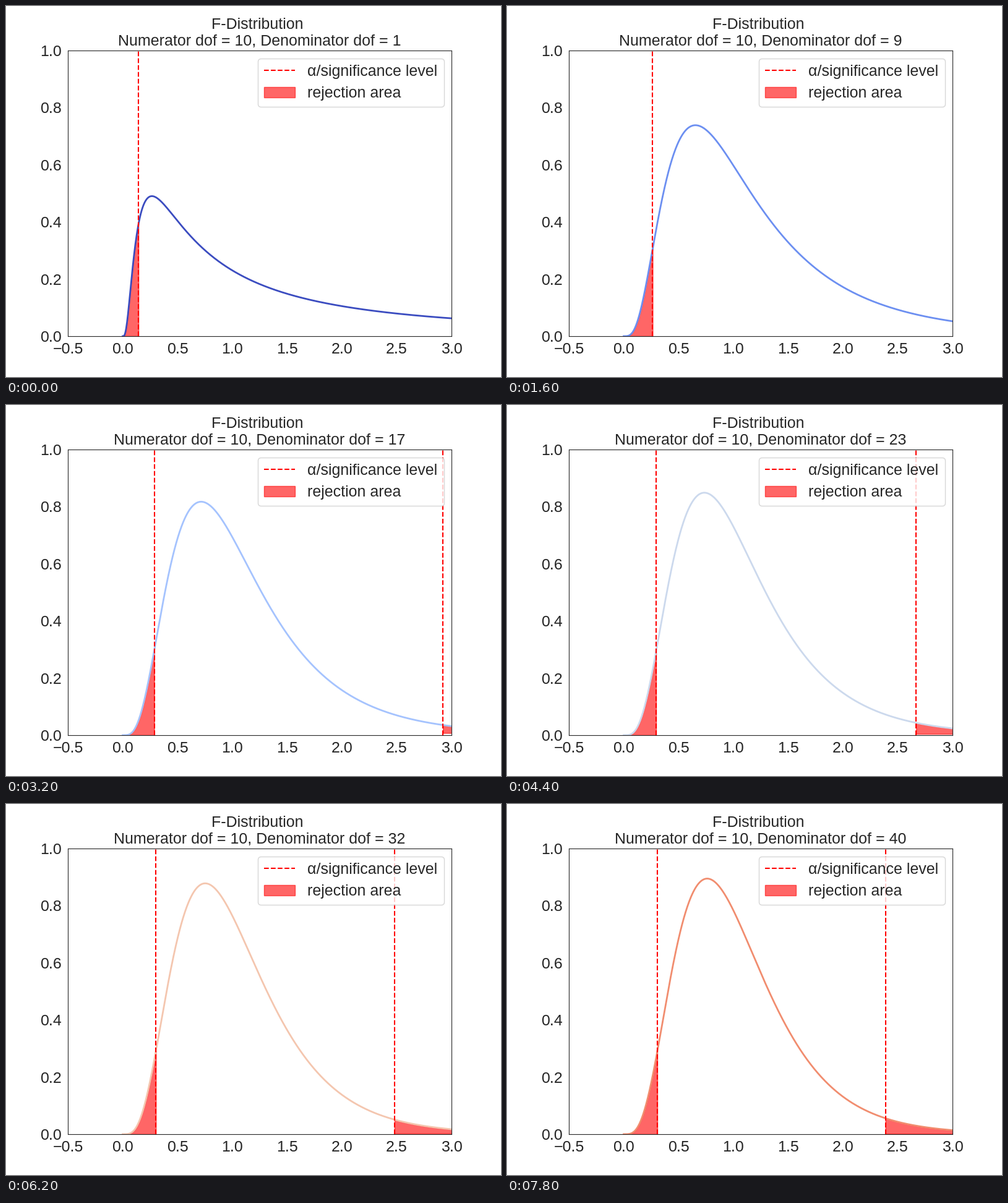
Animation of 800 by 600 pixels, one loop 8 s. Source, as a matplotlib script:

```python
import math

import matplotlib.pyplot as plt
import numpy as np
from matplotlib.animation import FuncAnimation

plt.rcParams.update({
    "font.family": "Liberation Sans",
    "font.size": 18,
    "text.hinting": "native",
    "axes.titlesize": 18,
    "axes.edgecolor": "0.15",
    "text.color": "0.15",
    "xtick.color": "0.15",
    "ytick.color": "0.15",
    "xtick.bottom": False,
    "ytick.left": False,
})

D1 = 10
FRAMES = 40
X_MAX = 4
TAIL = 0.025
CMAP = plt.get_cmap("coolwarm")
X = np.linspace(0, X_MAX, 1000)


def pdf(x, d2):
    a, b = D1 / 2, d2 / 2
    log_beta = math.lgamma(a) + math.lgamma(b) - math.lgamma(a + b)
    scale = (D1 / d2) ** a / math.exp(log_beta)
    return scale * x ** (a - 1) * (1 + D1 * x / d2) ** -(a + b)


def beta_cdf(x, b):
    """Regularised incomplete beta I_x(D1 / 2, b), closed form for even D1."""
    term = total = 1.0
    for j in range(1, D1 // 2):
        term *= (b + j - 1) / j * x
        total += term
    return 1 - (1 - x) ** b * total


def quantile(p, d2):
    lo, hi = 0.0, 1.0
    for _ in range(60):
        mid = (lo + hi) / 2
        if beta_cdf(mid, d2 / 2) < p:
            lo = mid
        else:
            hi = mid
    return d2 / D1 * lo / (1 - lo)


def shade(start, end, d2, label=None):
    x = np.linspace(start, end, 200)
    base = pdf(0 if start == 0 else end, d2)
    ax.fill_between(x, pdf(x, d2), base, color="red", alpha=0.6, label=label)


def draw(i):
    d2 = i + 1
    low, high = quantile(TAIL, d2), quantile(1 - TAIL, d2)
    ax.clear()
    ax.plot(X, pdf(X, d2), color=CMAP(i / 50), lw=2)
    ax.axvline(low, color="red", ls="--", label="α/significance level")
    ax.axvline(high, color="red", ls="--")
    shade(0, low, d2, "rejection area")
    if high < X_MAX:
        shade(high, X_MAX, d2)
    ax.set_xlim(-0.5, 3)
    ax.set_ylim(0, 1)
    ax.set_title(f"F-Distribution \nNumerator dof = {D1}, Denominator dof = {d2}")
    ax.legend(loc="upper right")


fig, ax = plt.subplots(figsize=(8, 6), dpi=100)
anim = FuncAnimation(fig, draw, frames=FRAMES, interval=200,
                     repeat=True, repeat_delay=0)
plt.show()
```
